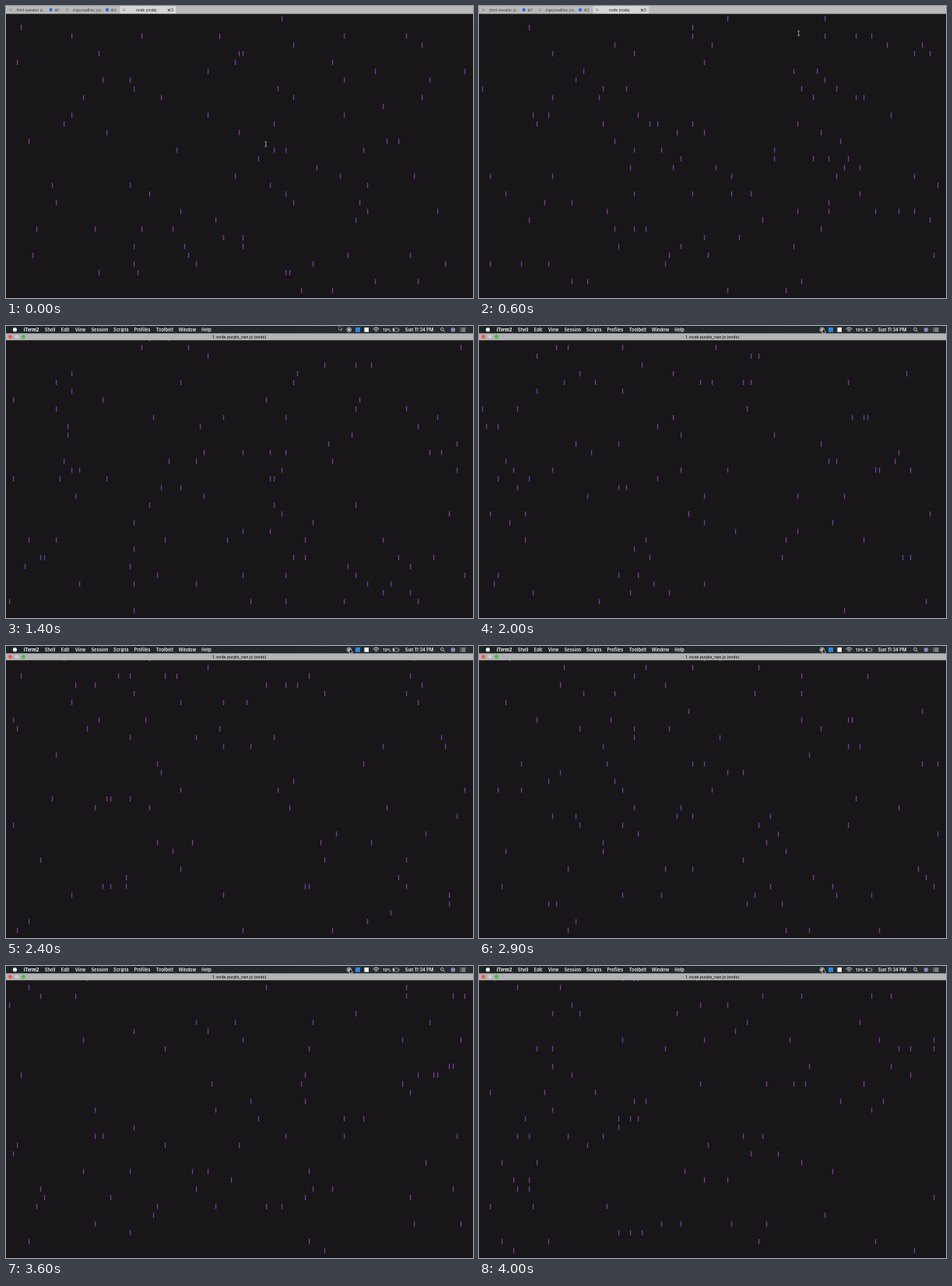
An HTML page for the animation above (4100 ms loop, 600x375 px).

```html
<!DOCTYPE html>
<html lang="en">
<head>
<meta charset="utf-8">
<title>Purple rain</title>
<style>
html, body { margin: 0; width: 100%; height: 100%; overflow: hidden; background: #181618; }
svg { display: block; width: 100vw; height: 100vh; }
text { font-family: Inter, "DejaVu Sans", sans-serif; text-anchor: middle; }
.menu text { font-size: 5.7px; font-weight: 600; fill: #f0f1f2; }
.tabs text { font-size: 4.6px; fill: #3c3c3c; }
.rain path { fill: none; stroke-width: 1.35; }
</style>
</head>
<body>
<svg viewBox="0 0 600 375" preserveAspectRatio="none">
  <defs>
    <linearGradient id="shade">
      <stop stop-color="#1d2427"/>
      <stop offset="1" stop-color="#272c30"/>
    </linearGradient>
  </defs>
  <rect width="600" height="375" fill="#181618"/>
  <g class="rain">
    <path id="purple" stroke="#7d3a9e"/>
    <path id="blue" stroke="#6144a2"/>
  </g>

  <g class="tabs" id="tabs">
    <rect width="600" height="10" fill="#b9b9b9"/>
    <rect x="146" width="73" height="10" fill="#d6d6d6"/>
    <path d="M73.2 0v10M146 0v10M219 0v10" stroke="#a0a0a0" stroke-width=".5"/>
    <path d="M0 10h600" stroke="#8d8d8d" stroke-width=".5"/>
    <path d="M4 3.2l3.4 3.4m0-3.4l-3.4 3.4M77 3.2l3.4 3.4m0-3.4l-3.4 3.4M150 3.2l3.4 3.4m0-3.4l-3.4 3.4" stroke="#666" stroke-width=".6"/>
    <circle cx="57.6" cy="4.9" r="2.2" fill="#1f6fe5"/>
    <circle cx="130" cy="4.9" r="2.2" fill="#1f6fe5"/>
  </g>

  <g id="top">
    <rect y="9" width="600" height="9.3" fill="#b3b3b3"/>
    <circle cx="5.5" cy="13.8" r="2.5" fill="#f35b52"/>
    <circle cx="14" cy="13.8" r="2.5" fill="#cdcdcd"/>
    <circle cx="22.4" cy="13.8" r="2.5" fill="#3ec544"/>
    <text x="299.8" y="15.7" font-size="5.1" font-weight="500" fill="#111">1. node purple_rain.js (node)</text>
    <g class="menu" id="menu">
      <rect width="600" height="9.4" fill="url(#shade)"/>
      <circle cx="11.4" cy="4.7" r="2.6" fill="#f4f4f4"/>
      <circle cx="440.8" cy="4.8" r="2.8" fill="none" stroke="#f4f4f4" stroke-width=".7"/>
      <circle cx="440.8" cy="4.8" r="1.5" fill="#f4f4f4"/>
      <rect x="449" y="1.8" width="6" height="6" fill="#2f86ea"/>
      <rect x="460.4" y="1.9" width="5.6" height="5.8" fill="#f4f4f4"/>
      <g fill="none" stroke="#f4f4f4" stroke-width=".9">
        <path d="M471.5 3.8q4-3.4 8 0M472.9 5.3q2.6-2.2 5.2 0M474.4 6.7q1.1-.9 2.2 0"/>
        <rect x="496.8" y="2.9" width="7.4" height="3.9" rx=".7" stroke-width=".5"/>
        <path d="M497.4 4.85h1.6" stroke-width="2.8"/>
        <path d="M505 4.1v1.5" stroke-width=".7"/>
        <circle cx="560.4" cy="4.2" r="1.9" stroke-width=".7"/>
        <path d="M561.8 5.6l2 2" stroke-width=".8"/>
        <path d="M583.3 2.9h1M585.2 2.9h5.2M583.3 4.8h1M585.2 4.8h5.2M583.3 6.7h1M585.2 6.7h5.2" stroke-width=".8"/>
      </g>
      <circle cx="574.4" cy="4.8" r="2.9" fill="#8583bd"/>
    </g>
  </g>

  <path id="beam" d="M-1.4-3.2q1.4 0 1.4 1v4.4q0 1-1.4 1M1.4-3.2q-1.4 0-1.4 1M1.4 3.2q-1.4 0-1.4-1" fill="none" stroke="#cfcfcf" stroke-width=".7"/>
  <path id="arrow" d="M0 0v6.2l1.4-1.3 1 2.2 1-.4-1-2.2h2z" fill="#0a0a0a" stroke="#f2f2f2" stroke-width=".5"/>
</svg>
<script>
const LOOP = 4100, STEP = 100;
const COLS = 118, ROWS = 32, DENSITY = 0.0245;
const CELL_W = 5, CELL_H = 11.255;
const el = id => document.getElementById(id);

function label(parent, x, y, str) {
  const t = document.createElementNS("http://www.w3.org/2000/svg", "text");
  t.setAttribute("x", x);
  t.setAttribute("y", y);
  t.textContent = str;
  parent.appendChild(t);
  return t;
}

[[31.2, "..html-sweater (z..."], [65.5, "⌘1"], [104.5, "..ings/readline (zs..."],
 [138, "⌘2"], [180.5, "node (node)"], [211, "⌘3"]]
  .forEach(([x, s], i) => {
    const t = label(el("tabs"), x, 6.6, s);
    if (i > 3) t.style.fill = "#111";
  });

[[32.5, "iTerm2"], [56.5, "Shell"], [76, "Edit"], [95.5, "View"], [120.3, "Session"],
 [147.8, "Scripts"], [175, "Profiles"], [203.8, "Toolbelt"], [233, "Window"],
 [257.5, "Help"], [489.6, "19%"], [531, "Sun 11:34 PM"]]
  .forEach(([x, s], i) => {
    const t = label(el("menu"), x, 6.8, s);
    if (!i) t.style.fontWeight = 800;
    if (s === "19%") t.style.fontSize = "5.1px";
  });

// Seeded generator (mulberry32)
function random(seed) {
  return () => {
    seed = (seed + 0x6D2B79F5) | 0;
    let t = Math.imul(seed ^ (seed >>> 15), 1 | seed);
    t = (t + Math.imul(t ^ (t >>> 7), 61 | t)) ^ t;
    return ((t ^ (t >>> 14)) >>> 0) / 4294967296;
  };
}

// Every step fills the terminal with a fresh scatter of drops
function drawRain(step) {
  const rnd = random(step * 7919 + 1984);
  let purple = "", blue = "";
  for (let r = 0; r < ROWS; r++) {
    for (let c = 0; c < COLS; c++) {
      if (rnd() >= DENSITY) continue;
      const drop = `M${4.6 + c * CELL_W} ${(12.9 + r * CELL_H).toFixed(2)}v6.8`;
      if (rnd() < 0.25) blue += drop;
      else purple += drop;
    }
  }
  el("purple").setAttribute("d", purple);
  el("blue").setAttribute("d", blue);
}

const ease = u => u * u * (3 - 2 * u);
const clamp = u => Math.min(1, Math.max(0, u));

// Pointer stops: time, x, y
const stops = [[0, 333.8, 177.3], [600, 410.6, 35], [900, 427.8, -0.8],
               [1400, 427.8, -0.8], [2000, 441.4, 3.4]];

function pointer(t) {
  let i = 1;
  while (i < stops.length - 1 && t > stops[i][0]) i++;
  const [t0, x0, y0] = stops[i - 1], [t1, x1, y1] = stops[i];
  const u = ease(clamp((t - t0) / (t1 - t0)));
  return [x0 + (x1 - x0) * u, y0 + (y1 - y0) * u];
}

function draw(step) {
  const t = step * STEP;
  drawRain(step);
  const drop = ease(clamp((t - 900) / 300));
  el("top").setAttribute("transform", `translate(0 ${(drop - 1) * 18.5})`);
  const [x, y] = pointer(t), onBar = y < 10;
  for (const id of ["beam", "arrow"]) {
    el(id).setAttribute("transform", `translate(${x} ${y})`);
    el(id).style.display = (id === "arrow") === onBar ? "" : "none";
  }
}

const start = performance.now();
let shown = -1;
function tick() {
  const step = Math.floor(((performance.now() - start) % LOOP) / STEP);
  if (step !== shown) draw(shown = step);
  requestAnimationFrame(tick);
}
tick();
</script>
</body>
</html>
```
